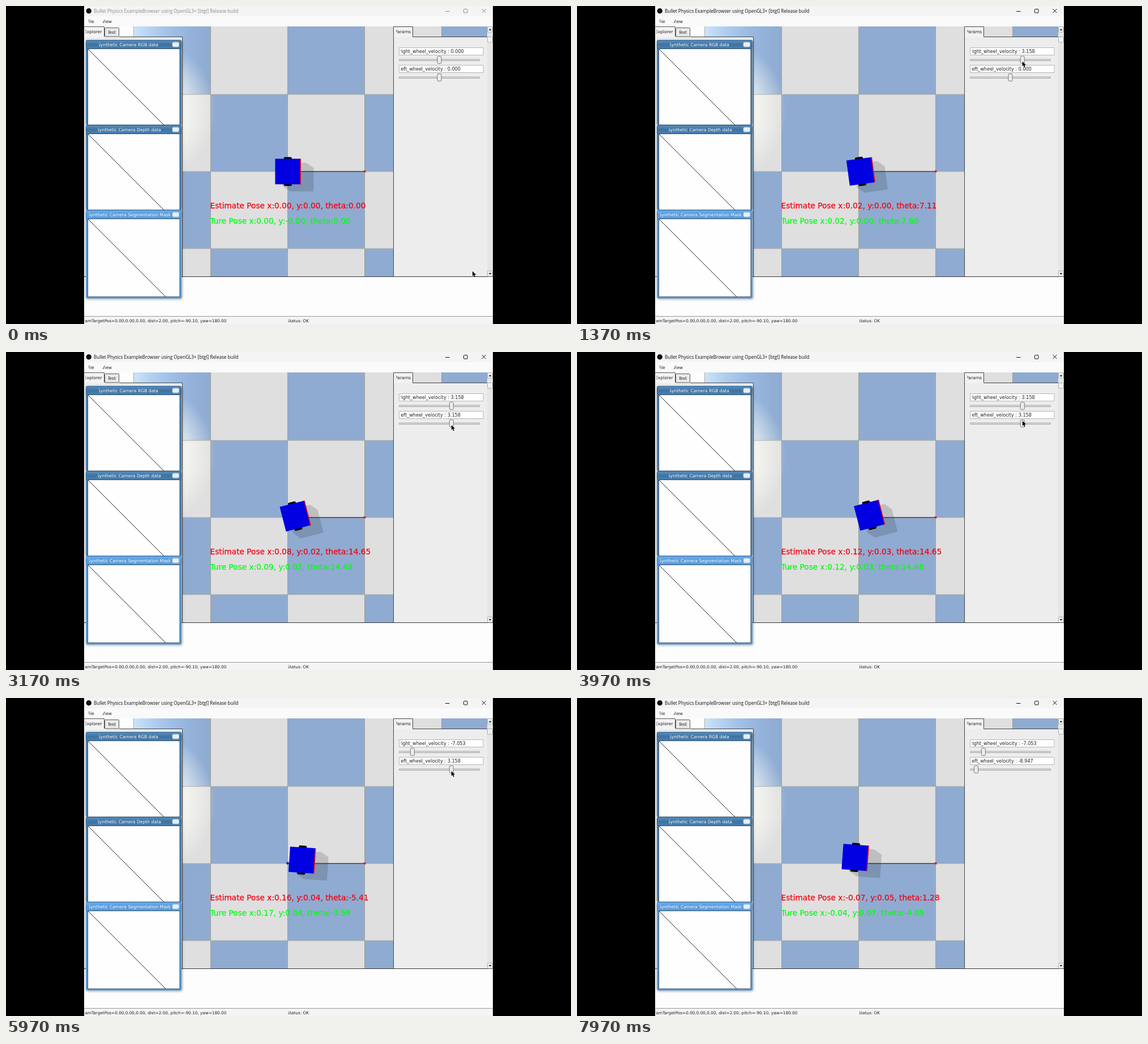
An HTML page with a canvas that plays this animation: 998 by 561 pixels, repeating every 8000 ms.

```html
<!DOCTYPE html>
<html lang="en">
<head>
<meta charset="utf-8">
<title>Differential drive simulation</title>
<style>
html, body { margin: 0; width: 100%; height: 100%; overflow: hidden; background: #000; }
canvas { display: block; }
</style>
</head>
<body>
<canvas id="stage" width="998" height="561"></canvas>
<script>
const LOOP = 8000;
const UI_FONT = '"DejaVu Sans", sans-serif';
const TITLE_FONT = '"Open Sans", sans-serif';
const STEP = 2 / 19;          // slider resolution
const WHEEL_RADIUS = .0152;
const TRACK = .3214;          // distance between the wheels
const DRAG_HALF = 100;        // half the duration of a slider drag, ms
const ROW = { right: 95, left: 126 };
const ctx = document.getElementById('stage').getContext('2d');

// Slider drags: middle time, new slider position, and by how many ms
// the real wheels trail the odometry.
const drags = [
  { wheel: 'right', at: 540, to: 30 * STEP, slip: -57 },
  { wheel: 'left', at: 2252, to: 30 * STEP, slip: -77 },
  { wheel: 'right', at: 5246, to: -67 * STEP, slip: 72 },
  { wheel: 'left', at: 6080, to: -85 * STEP, slip: 218 }
];

const clamp = v => Math.min(1, Math.max(0, v));
const mix = (a, b, k) => a + (b - a) * k;
const ease = k => k * k * (3 - 2 * k);
const knobX = v => 765.5 + 6.75 * v;

function wheelSpeed(wheel, t, slipping = false) {
  return drags.filter(d => d.wheel === wheel).reduce((speed, d) => {
    const middle = d.at + (slipping ? d.slip : 0);
    return mix(speed, d.to, clamp((t - middle + DRAG_HALF) / (2 * DRAG_HALF)));
  }, 0);
}

// Differential drive: integrate both wheel speeds up to time t.
function drivePose(t, slipping, y = 0) {
  const dt = 10;
  let x = 0, theta = 0;
  for (let s = 0; s < t; s += dt) {
    const span = Math.min(dt, t - s) / 1000;
    const right = wheelSpeed('right', s + dt / 2, slipping) * WHEEL_RADIUS;
    const left = wheelSpeed('left', s + dt / 2, slipping) * WHEEL_RADIUS;
    x += (right + left) / 2 * Math.cos(theta) * span;
    y += (right + left) / 2 * Math.sin(theta) * span;
    theta += (right - left) / TRACK * span;
  }
  return [x, y, theta];
}

// The pointer follows each dragged knob and moves on halfway through every pause.
function cursorAt(t) {
  const tip = (d, time) => [knobX(wheelSpeed(d.wheel, time)), ROW[d.wheel] + 3];
  let from = [824, 468], left = 0;
  for (const d of drags) {
    const start = d.at - DRAG_HALF, end = d.at + DRAG_HALF;
    if (t < start) return travel(from, tip(d, start), left, start, t);
    if (t < end) return tip(d, t);
    from = tip(d, end);
    left = end;
  }
  return travel(from, [866, 548], left, 6700, t);
}

function travel(from, to, start, end, t) {
  const k = ease(clamp(((t - start) / (end - start) - .5) * 4));
  return from.map((v, i) => mix(v, to[i], k));
}

function box(x, y, w, h, fill, stroke, radius = 0) {
  ctx.beginPath();
  ctx.roundRect(x, y, w, h, radius);
  if (fill) { ctx.fillStyle = fill; ctx.fill(); }
  if (stroke) { ctx.strokeStyle = stroke; ctx.lineWidth = 1; ctx.stroke(); }
}

function trace(...points) {
  ctx.beginPath();
  for (let i = 0; i < points.length; i += 2) ctx.lineTo(points[i], points[i + 1]);
}

function line(color, width, ...points) {
  trace(...points);
  ctx.strokeStyle = color;
  ctx.lineWidth = width;
  ctx.stroke();
}

function shape(color, ...points) {
  trace(...points);
  ctx.fillStyle = color;
  ctx.fill();
}

function text(str, x, y, size, color = '#222', font = UI_FONT) {
  ctx.font = `${size}px ${font}`;
  ctx.fillStyle = color;
  ctx.fillText(str, x, y);
}

// The toolkit cuts off the first columns of its labels.
function label(str, x, y, size, color) {
  ctx.save();
  ctx.beginPath();
  ctx.rect(x + 2, y - 20, 400, 30);
  ctx.clip();
  text(str, x, y, size, color);
  ctx.restore();
}

function poseText(name, [x, y, theta], baseline, color) {
  const degrees = theta * 180 / Math.PI;
  const str = `${name} Pose x:${x.toFixed(2)}, y:${y.toFixed(2)}, theta:${degrees.toFixed(2)}`;
  text(str, 360.5, baseline, 13.7, color);
  ctx.strokeStyle = color;
  ctx.lineWidth = .25;
  ctx.strokeText(str, 360.5, baseline);
}

function gradient(g, ...colors) {
  colors.forEach((c, i) => g.addColorStop(i / (colors.length - 1), c));
  return g;
}

function drawGround() {
  const cell = 136, x0 = 89.5, y0 = 20;
  ctx.save();
  ctx.beginPath();
  ctx.rect(138, 36, 722, 441);
  ctx.clip();
  for (let row = 0; row < 4; row++) {
    for (let col = 0; col < 6; col++) {
      box(x0 + col * cell, y0 + row * cell, cell, cell, (row + col) % 2 ? '#90abd1' : '#dfdfe0');
    }
  }
  box(225.5, 36, 136, 120, gradient(ctx.createLinearGradient(225, 0, 361, 0),
    'rgba(210,235,255,.9)', 'rgba(175,210,250,.5)', 'rgba(150,190,240,0)'));
  box(138, 36, 260, 320, gradient(ctx.createRadialGradient(240, 185, 10, 240, 185, 130),
    'rgba(255,255,250,1)', 'rgba(255,255,248,.75)', 'rgba(255,255,245,0)'));
  box(138, 36, 87.5, 20, '#fdfdfd');
  for (let i = 1; i < 6; i++) line('#a5a596', .8, x0 + i * cell, 36, x0 + i * cell, 477);
  for (let i = 1; i < 4; i++) line('#a5a596', .8, 138, y0 + i * cell, 860, y0 + i * cell);
  line('#5f5f59', 2, 497.5, 292, 633, 292);
  box(631.5, 290, 4, 3.5, '#c92a2a');
  box(496.5, 154, 2.5, 2.5, '#70c878');
  box(495.5, 289.5, 4, 4, '#1414d8');
  ctx.restore();
}

function drawRobot([px, py, theta]) {
  const x = 497.8 + 150 * px, y = 292 - 150 * py, half = 22.4;

  // Shadow: the body's square swept away from the light.
  const c = Math.cos(theta) * 21, s = -Math.sin(theta) * 21;
  ctx.beginPath();
  for (let k = 0; k <= 1; k += .1) {
    const cx = x + mix(12, 24.5, k), cy = y + mix(5.5, 14, k);
    ctx.moveTo(cx - c + s, cy - s - c);
    ctx.lineTo(cx + c + s, cy + s - c);
    ctx.lineTo(cx + c - s, cy + s + c);
    ctx.lineTo(cx - c - s, cy - s + c);
    ctx.closePath();
  }
  ctx.fillStyle = 'rgba(35,40,40,.18)';
  ctx.fill();

  ctx.save();
  ctx.translate(x, y);
  ctx.rotate(-theta);
  box(-7, -25.5, 14, 51, '#000', null, 2);
  box(-half, -half, 2 * half, 2 * half, '#0000e0');
  box(half - .8, -half, 1.6, 2 * half, '#e8101c');
  ctx.restore();
}

function drawCameraWindow(title, titleX, y, height, active) {
  const frame = active ? '#5c9edc' : '#4a80b0';
  const side = height - (active ? 18.5 : 15.5);
  ctx.save();
  ctx.shadowColor = 'rgba(0,0,0,.4)';
  ctx.shadowBlur = 4;
  ctx.shadowOffsetX = ctx.shadowOffsetY = 1;
  box(141, y, 169, height, frame, null, 3);
  ctx.restore();
  const bar = gradient(ctx.createLinearGradient(0, y, 0, y + 16),
    active ? '#70b0ec' : '#5b91c0', active ? '#5599dc' : '#3d73a3', frame);
  box(141.5, y + .5, 168, 15.5, bar, active ? '#3f82c4' : '#2d5f8c', 3);
  label(title, titleX, y + 11, 7.65, '#fff');
  box(294, y + 4, 11.5, 8, '#e9eef3', '#b9c6d2', 2);
  box(144.5, y + 15.5, 162.5, side, '#fefefe', '#35516b');
  line('#111', .9, 145, y + 16, 144.5 + side, y + 15.5 + side);
}

function drawLeftPanel() {
  box(138, 54, 173.5, 423, '#eeeeee');
  line('#444', 1, 200, 54.5, 311.5, 54.5, 311.5, 477);
  box(138, 37, 35.5, 18, '#f3f3f3');
  line('#555', 1, 138, 36.5, 173.5, 36.5, 173.5, 54);
  box(174.5, 38.5, 25, 15.5, '#eaeaea', '#555', 1);
  label('Explorer', 138, 47.5, 7.6);
  label('Test', 179, 48.5, 7.6);
  box(138, 477, 722, 71, '#fdfdfd');
  line('#333', 1, 138, 477.5, 860, 477.5);
  drawCameraWindow('Synthetic Camera RGB data', 162, 60, 150, false);
  drawCameraWindow('Synthetic Camera Depth data', 160, 210, 150, false);
  drawCameraWindow('Synthetic Camera Segmentation Mask', 144.5, 360, 156, true);
}

function drawSlider(wheel, t) {
  const y = ROW[wheel];
  const v = Math.round(wheelSpeed(wheel, t) / STEP) * STEP;
  box(694.5, y - 21.5, 148.5, 13, '#fff', '#b5b5b5');
  label(`${wheel}_wheel_velocity : ${v.toFixed(3)}`, 695, y - 12.5, 8.1);
  box(694.5, y - 1, 142, 2.5, '#d9d9d9', '#aaa');
  box(knobX(v) - 3.5, y - 6.5, 7, 13, '#ededed', '#777', 2);
}

function drawParams(t) {
  box(684, 54, 166, 423, '#ededed');
  line('#444', 1, 684.5, 477, 684.5, 36.5, 718.5, 36.5, 718.5, 54.5, 850, 54.5);
  box(685, 37, 33, 18, '#f2f2f2');
  label('Params', 687, 47.5, 7.6);
  drawSlider('right', t);
  drawSlider('left', t);
  box(850, 36, 10, 441, '#e6e6e6');
  for (const y of [36.5, 54.5, 467.5]) box(850.5, y, 9, 9.5, '#f2f2f2', '#aaa', 1);
  shape('#222', 852.5, 43, 857.5, 43, 855, 40);
  shape('#222', 852.5, 471, 857.5, 471, 855, 474);
}

function drawChrome(focused) {
  const ink = focused ? '#111' : '#8b8b8b';
  box(138, 0, 722, 18, '#f4f4f4');
  box(138, 18, 722, 18, '#fafafa');
  box(141.5, 4, 9.5, 9.5, '#111', null, 5);
  text('Bullet Physics ExampleBrowser using OpenGL3+ [btgl] Release build',
    155, 12, 8.1, ink, TITLE_FONT);
  line(ink, 1, 776, 9.5, 783.5, 9.5);
  box(808.5, 5.5, 6.5, 6.5, null, ink, 1);
  line(ink, 1, 840.5, 5, 847.5, 12);
  line(ink, 1, 847.5, 5, 840.5, 12);
  label('File', 143, 30, 7.6);
  label('View', 169, 30, 7.6);
  box(138, 547, 722, 14, '#f4f4f4');
  line('#999', 1, 138, 547.5, 860, 547.5);
  label('ramTargetPos=0.00,0.00,0.00, dist=2.00, pitch=-90.10, yaw=180.00', 136.5, 557.5, 7.3);
  label('Status: OK', 496.5, 557.5, 7.3);
}

function drawCursor([x, y]) {
  ctx.save();
  ctx.translate(x, y);
  shape('#000', 0, 0, 0, 8.6, 2, 6.8, 3.5, 10.3, 4.9, 9.6, 3.5, 6.3, 6.2, 6.1);
  ctx.restore();
}

function draw(t) {
  const pose = drivePose(t, true, -.0001);
  ctx.fillStyle = '#000';
  ctx.fillRect(0, 0, 998, 561);
  ctx.save();
  ctx.beginPath();
  ctx.rect(138, 0, 722, 561);
  ctx.clip();
  drawGround();
  drawRobot(pose);
  poseText('Estimate', drivePose(t, false), 357, '#f80010');
  poseText('Ture', pose, 384, '#08fa18');
  drawLeftPanel();
  drawParams(t);
  drawChrome(t >= drags[0].at - DRAG_HALF);
  drawCursor(cursorAt(t));
  ctx.restore();
}

const start = performance.now();
function tick() {
  draw((performance.now() - start) % LOOP);
  requestAnimationFrame(tick);
}
tick();
</script>
</body>
</html>
```
